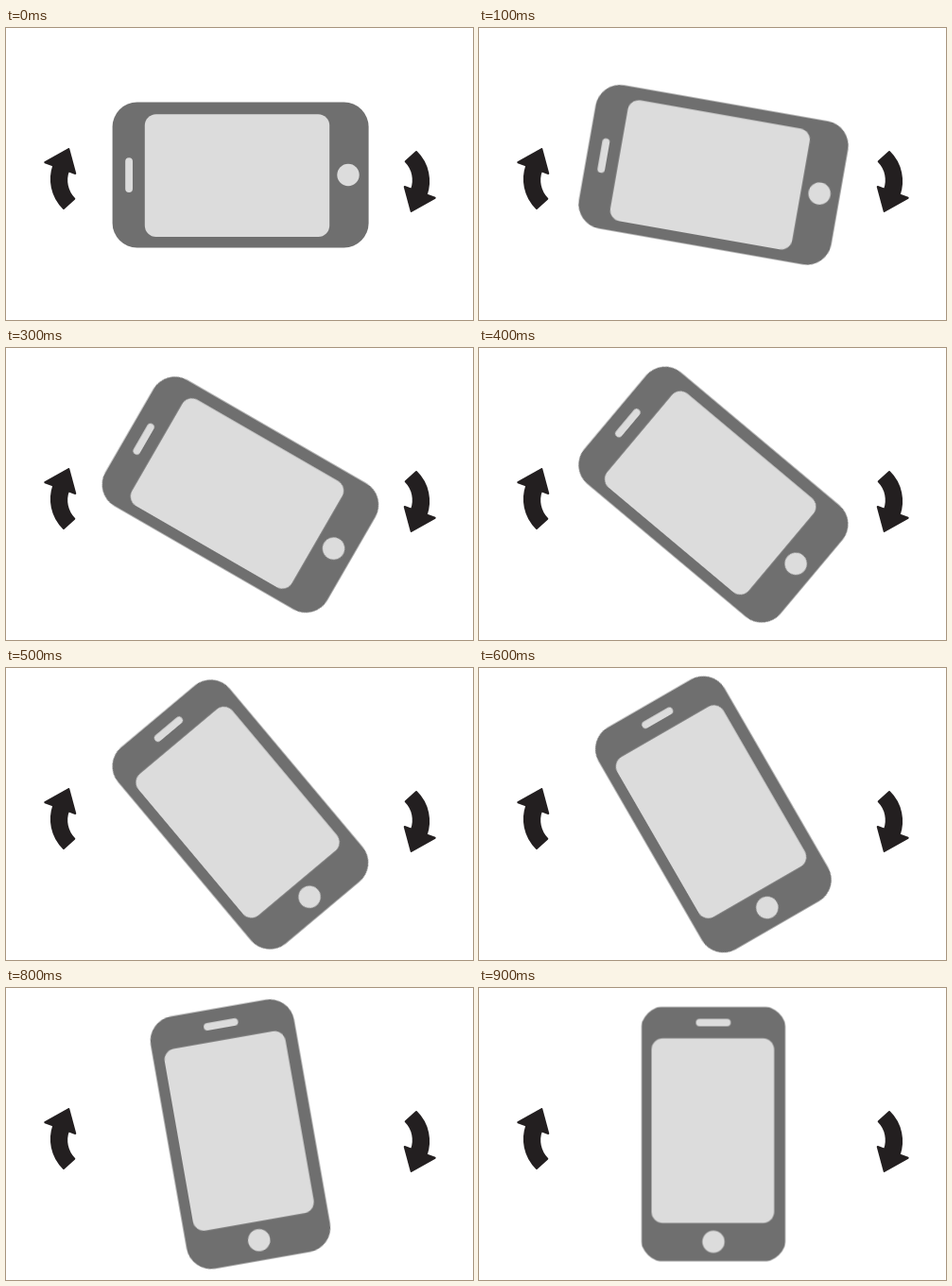
An HTML page for the animation above (2.9 s loop, 494 px wide and 309 px high).

```html
<!DOCTYPE html>
<html lang="en">
<head>
<meta charset="utf-8">
<title>Rotate phone</title>
<style>
  html, body {
    margin: 0;
    width: 100%;
    height: 100%;
    overflow: hidden;
    background: #fff;
  }
  svg {
    display: block;
    width: 494px;
    height: 309px;
  }
  .arrow {
    fill: #231f20;
    stroke: #231f20;
    stroke-width: 2;
    stroke-linejoin: round;
  }
  .body { fill: #6f6f6f; animation: trim 2.9s step-end infinite; }
  .light { fill: #dcdcdc; }
  .phone {
    transform-origin: 248.5px 155px;
    animation: turn 2.9s infinite;
  }
  /* nine 10-degree steps in 900 ms, then a two-second hold */
  @keyframes turn {
    0% { transform: rotate(0deg); animation-timing-function: steps(9, end); }
    31.0344%, 100% { transform: rotate(90deg); }
  }
  /* the upright phone has slightly cropped edges */
  @keyframes trim {
    0% { clip-path: none; }
    31.0344%, 100% { clip-path: inset(1px); }
  }
</style>
</head>
<body>
<svg viewBox="0 0 494 309">
  <defs>
    <path id="arrow" d="M66.3 128L41.3 142.2L50.3 145.6C45.3 160 47.8 178 61 191L72.3 180.7C64.5 173 62.2 161 66 151.2L73.3 154Z"/>
  </defs>
  <use class="arrow" href="#arrow"/>
  <use class="arrow" href="#arrow" transform="rotate(180 247.5 161)"/>
  <g class="phone">
    <rect class="body" x="112.6" y="78.6" width="271" height="153.8" rx="26"/>
    <rect class="light" x="146.8" y="91.2" width="195.4" height="129.8" rx="12"/>
    <rect class="light" x="126.2" y="137.2" width="7.8" height="36.8" rx="3.9"/>
    <circle class="light" cx="362" cy="155.5" r="11.7"/>
  </g>
</svg>
</body>
</html>
```
